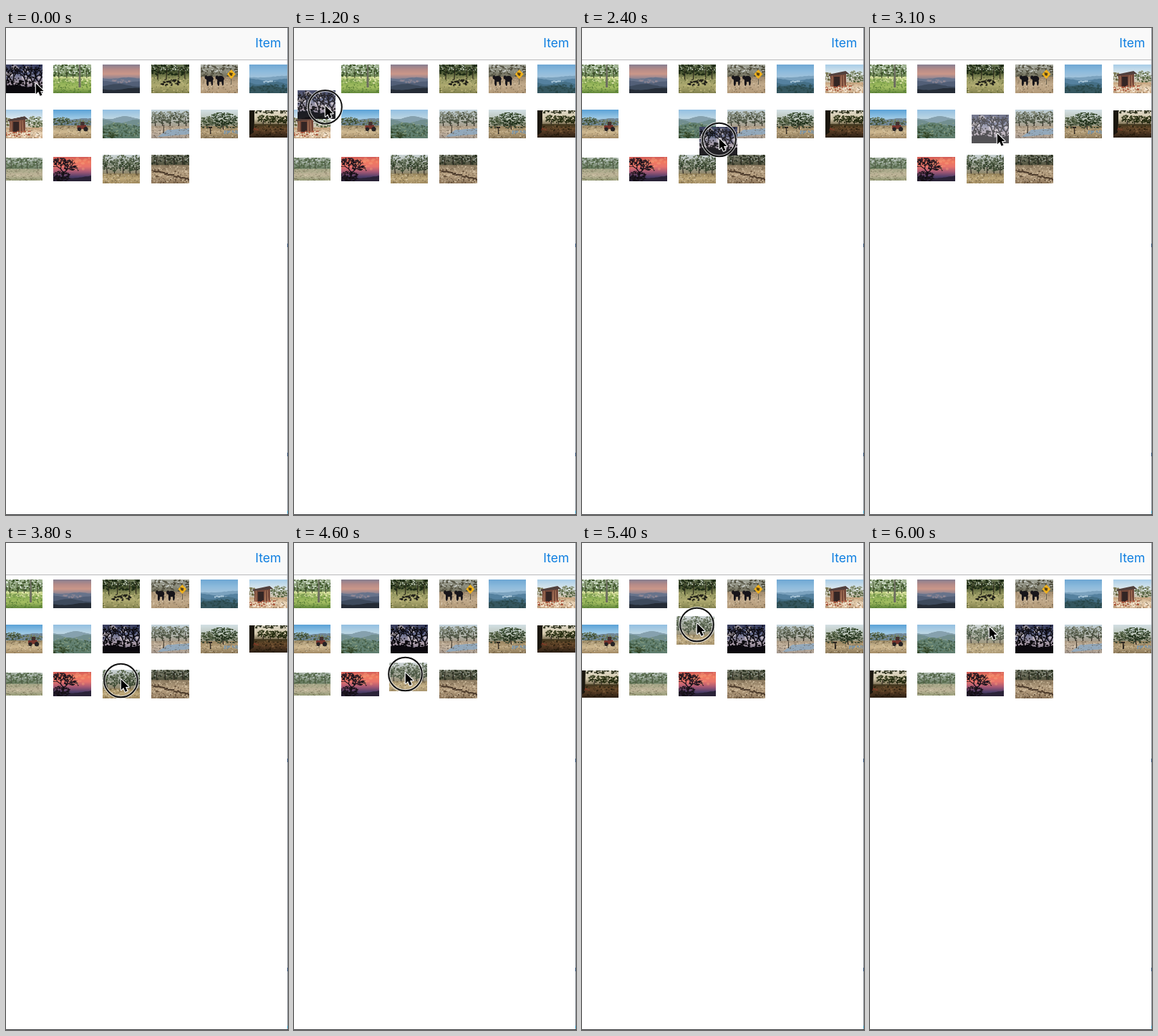
Write an HTML page with a canvas that moves like this. It is 394 px wide and 680 px high and loops after 6.1 s.

```html
<!DOCTYPE html>
<html lang="en">
<head>
<meta charset="utf-8">
<title>Reorder grid</title>
<style>
  html, body { margin: 0; width: 100%; height: 100%; overflow: hidden; background: #fff; }
  #stage { position: relative; width: 394px; height: 680px; overflow: hidden; background: #fff; }
  header { position: absolute; inset: 0 0 auto 0; height: 44px; background: #f9f9f9; border-bottom: 1px solid #b9b9bb; }
  header span { position: absolute; right: 9.5px; top: 10px; font: 17.6px/22px Inter, "Liberation Sans", sans-serif; color: #0f7fe0; }
  canvas { position: absolute; left: 0; top: 0; width: 394px; height: 680px; }
</style>
</head>
<body>
<div id="stage"><header><span>Item</span></header><canvas id="view"></canvas></div>
<script>
const LOOP = 6100, STEP = 100, MOVE = 300;
const W = 52.5, H = 39.5;
const dpr = window.devicePixelRatio || 1;
const view = document.getElementById('view');
view.width = 394 * dpr;
view.height = 680 * dpr;
const ctx = view.getContext('2d');

// ---- thumbnails ----
let g, seed = 1;
const rnd = (a = 0, b = 1) => {
  seed = seed * 16807 % 2147483647;
  return a + (b - a) * seed / 2147483647;
};
const box = (x, y, w, h, color) => { g.fillStyle = color; g.fillRect(x, y, w, h); };
const dot = (x, y, rx, ry) => { g.beginPath(); g.ellipse(x, y, rx, ry, 0, 0, 7); g.fill(); };

function poly(color, ...pts) {
  g.fillStyle = color;
  g.beginPath();
  pts.forEach(([x, y]) => g.lineTo(x, y));
  g.fill();
}
function fade(y, h, ...colors) {
  const grad = g.createLinearGradient(0, y, 0, y + h);
  colors.forEach((c, i) => grad.addColorStop(i / (colors.length - 1), c));
  box(0, y, W, h, grad);
}
function ridge(y, amp, color) {
  const a = rnd(0, 6), k = rnd(0.08, 0.16), pts = [[0, H]];
  for (let x = 0; x <= W + 3; x += 3) pts.push([x, y + amp * Math.sin(a + x * k) + rnd(-0.4, 0.4)]);
  poly(color, ...pts, [W + 3, H]);
}
function specks(x, y, w, h, n, r, color) {
  g.fillStyle = color;
  while (n--) dot(rnd(x, x + w), rnd(y, y + h), rnd(r * 0.4, r), rnd(r * 0.3, r * 0.75));
}
// Oval crown of small leaves, shaded towards its foot.
function crown(x, y, rx, ry, dark, light) {
  for (let i = 0; i < rx * ry * 1.1; i++) {
    const a = rnd(0, 6.3), d = Math.sqrt(rnd()), dy = Math.sin(a) * d;
    g.fillStyle = rnd(-1.4, 0.8) > dy ? light : dark;
    dot(x + Math.cos(a) * d * rx, y + dy * ry, rnd(0.5, 1.6), rnd(0.4, 1.2));
  }
}
function trunk(x, top, base, w, color) {
  const lean = rnd(-1.5, 1.5);
  poly(color, [x, base], [x + lean, top], [x + lean + w * 0.6, top], [x + w, base]);
}
function tree(x, base, w, h, dark, light) {
  trunk(x, base - h * 0.6, base, 1.3, '#2d261f');
  crown(x, base - h * 0.62, w / 2, h * 0.38, dark, light);
}
function branch(x, y, a, len) {
  if (len < 2) return;
  const x2 = x + Math.cos(a) * len, y2 = y + Math.sin(a) * len;
  g.lineWidth = len / 7 + 0.3;
  g.beginPath();
  g.moveTo(x, y);
  g.lineTo(x2, y2);
  g.stroke();
  for (const s of [-1, 1]) branch(x2, y2, a + s * rnd(0.25, 0.75), len * rnd(0.65, 0.8));
}
// Dry ground with flecks of shade and light.
function ground(y, ...colors) {
  fade(y, H - y, ...colors);
  specks(0, y, W, H - y, 60, 1.3, '#3c301e55');
  specks(0, y, W, H - y, 45, 1.3, '#f4e8cf66');
}

const photos = [
  { draw() { // bare trees at dusk
    fade(0, H, '#363b5c', '#6f7594', '#a99ba6', '#56536e');
    specks(0, 3, W, 20, 14, 5, '#e6d8d899');
    specks(0, 0, W, 24, 14, 4, '#2a305399');
    ridge(30, 1.5, '#0b090e');
    g.strokeStyle = '#0b090e';
    for (const x of [4, 13, 30, 41, 49]) branch(x, 36, -1.57 + rnd(-0.2, 0.2), 11);
    specks(0, 0, W, 34, 70, 1.6, '#0b090e');
    specks(0, 22, W, 11, 40, 2, '#0b090e');
  } },
  { draw() { // green meadow
    fade(0, H, '#a9bb9c', '#6c8650', '#a9c06c');
    specks(0, 0, W, 17, 100, 1.9, '#3c5529');
    specks(0, 0, W, 13, 55, 1.4, '#e6efe6');
    fade(17, H - 17, '#c6d28b', '#8cae55', '#a5bf63', '#648a3c');
    specks(0, 17, W, 9, 40, 2, '#dbe3a4');
    specks(0, 20, W, 19, 110, 1.3, '#4b7230aa');
    trunk(35, 0, 32, 3.2, '#6d6d60');
    for (const x of [7, 18, 27, 46]) trunk(x, 4, 19, 1, '#3b4129');
  } },
  { draw() { // hazy dusk
    fade(0, H, '#878091', '#b48a88', '#cb988a', '#8d8492', '#66718a', '#434f65', '#2b3444');
    ridge(19, 1, '#67738b');
    ridge(24, 1.5, '#525f77');
    specks(14, 21, 24, 5, 18, 2, '#a8949a77');
    ridge(29, 2, '#3d4a5c');
    ridge(34, 1.5, '#252c36');
  } },
  { draw() { // grove
    fade(0, H, '#6d7a59', '#46522f', '#939660', '#aeaa70', '#848350');
    specks(0, 0, W, 15, 110, 1.9, '#1f2c17');
    specks(0, 0, W, 11, 40, 1.1, '#d8e0d2');
    for (const x of [8, 20, 37, 46]) trunk(x, 3, 21, 1.2, '#282518');
    specks(0, 17, W, 22, 65, 1.3, '#d8cc92aa');
    specks(0, 17, W, 22, 50, 1.2, '#535a2faa');
    specks(9, 21, 30, 8, 30, 2, '#23221a');
  } },
  { draw() { // cattle
    fade(0, 19, '#a5a89d', '#706d58');
    specks(0, 0, W, 16, 90, 1.8, '#504e3e');
    specks(0, 0, W, 11, 40, 1.2, '#cfd3d0');
    ground(17, '#a08a6d', '#c2ab8c', '#b39a79');
    g.fillStyle = '#17151a';
    for (const x of [13, 28]) {
      dot(x, 20, 5, 4.2);
      dot(x - 5, 18, 2.2, 2.6);
      dot(x - 3, 25, 1.6, 5);
      dot(x + 3, 25, 1.4, 4.5);
    }
    trunk(42.5, 12, 28, 1, '#5e5848');
    poly('#efb11c', [43, 7], [49, 13.5], [43, 20], [37, 13.5]);
    poly('#594313', [40, 11], [45, 12], [44, 16], [41, 15]);
  } },
  { draw() { // blue lake
    fade(0, H, '#6fa8d4', '#8dbbdd', '#a6c5da', '#6d98b6', '#395c70');
    ridge(17, 1.2, '#7ba2be');
    ridge(21, 1.5, '#55819f');
    specks(20, 23, 18, 2, 14, 1.8, '#a9c6d8');
    ridge(26, 2, '#456f86');
    ridge(31, 2, '#35565f');
    specks(0, 28, W, 11, 60, 1.7, '#274343aa');
  } },
  { draw() { // hut
    fade(0, 26, '#a8cde8', '#dfe9ed', '#c8b99f');
    crown(43, 17, 13, 8, '#55633f', '#879070');
    crown(3, 16, 6, 6, '#66653f', '#8e8a66');
    ground(25, '#c39f78', '#e6d0b2', '#c9a683');
    box(7, 13, 22, 18, '#75493a');
    for (const x of [8, 21, 25]) trunk(x, 15, 31, 1.6, '#a8765a');
    box(12, 17, 8, 14, '#332524');
    poly('#51403d', [4, 14], [28, 9], [33, 13], [5, 16]);
    specks(0, 30, 36, 7, 30, 1.8, '#a8553b');
    specks(0, 31, W, 8, 30, 1.6, '#f7e9d6');
  } },
  { draw() { // tractor
    fade(0, 24, '#5ca3d8', '#9fcae5', '#a7b6aa');
    ridge(13, 1, '#72899a');
    crown(10, 16, 14, 6, '#3c4d33', '#66745a');
    crown(38, 18, 15, 4, '#4b5a3e', '#75805f');
    ground(22, '#9d8d6a', '#d0ba92', '#a48c67');
    poly('#77362e', [33, 22], [45, 21], [47, 27], [33, 27]);
    box(38, 17, 5, 5, '#42302f');
    g.fillStyle = '#262325';
    dot(36, 27, 2.7, 2.8);
    dot(45, 27, 3.2, 3.2);
  } },
  { draw() { // hazy hills
    fade(0, H, '#94c0e2', '#c0d8e3', '#7f9a98', '#5d7358');
    ridge(11, 2, '#86a1ae');
    ridge(16, 2.5, '#728f90');
    ridge(21, 3, '#617f70');
    specks(0, 21, W, 18, 90, 1.8, '#3a5339aa');
    specks(0, 17, W, 20, 60, 1.4, '#9aab8799');
    crown(8, 35, 12, 5, '#334629', '#55694a');
  } },
  { draw() { // roadside trees
    fade(0, 26, '#c3d3dc', '#b4b9b2', '#a1947f');
    for (const x of [5, 15, 25, 37, 48]) tree(x, 25, 14, 23, '#4e5544', '#858b7b');
    ground(23, '#ab9a83', '#c7b6a3', '#a2968c');
    poly('#93a9bc', [22, 28], [W, 26], [W, 34], [8, 38]);
    specks(0, 26, W, 12, 30, 1.3, '#665c5088');
    trunk(16, 21, 33, 1.3, '#3f382e');
  } },
  { draw() { // oak
    fade(0, 26, '#d3e0e5', '#bcc5ba', '#8f8a70');
    specks(0, 13, W, 10, 60, 1.8, '#6a735d');
    ground(23, '#96835f', '#b7a17b', '#8d7a5a');
    tree(31, 28, 42, 24, '#25351f', '#43563a');
    crown(9, 15, 9, 6, '#465438', '#6c775b');
    specks(0, 20, W, 6, 30, 1.8, '#3b4530');
    specks(32, 29, 20, 4, 16, 1.8, '#7d95a6');
    trunk(13, 24, 34, 1.8, '#2c2620');
    box(11, 24, 5, 2, '#2c2620');
  } },
  { h: 38, draw() { // dark field
    fade(0, 24, '#ded8c8', '#d4c9ac', '#56492e');
    specks(0, 0, W, 4, 40, 1.9, '#2c301b');
    for (const x of [18, 29, 40, 50]) tree(x, 22, 15, 15, '#23290f', '#454a2a');
    fade(20, H - 20, '#3c341c', '#624629', '#4a331f', '#2c2015');
    specks(8, 22, W, 12, 40, 1.4, '#94704677');
    specks(0, 22, W, 17, 50, 1.5, '#1d1609aa');
    poly('#1b170f', [0, 0], [7, 0], [6, 32], [0, 36]);
    specks(0, 26, 12, 4, 6, 1.2, '#8a3325');
  } },
  { h: 32, draw() { // pale field
    fade(0, 21, '#a3b0a2', '#6f8066');
    specks(0, 0, W, 19, 130, 2, '#566a4b');
    specks(0, 0, W, 12, 45, 1.3, '#c9d2cf');
    for (const x of [9, 24, 32, 45]) trunk(x, 3, 20, 1.1, '#454f3b');
    ground(19, '#a5a787', '#c0b59a', '#969c78');
    specks(0, 22, W, 17, 50, 1.3, '#7c876577');
  } },
  { h: 34.5, draw() { // red sunset
    fade(0, H, '#d25a56', '#f07a60', '#e8736c', '#a95a75', '#51406b', '#2c2640');
    specks(18, 2, 35, 18, 26, 3, '#f8a07a66');
    ridge(32, 2, '#2a2338');
    g.strokeStyle = '#17111a';
    branch(12, 38, -1.4, 12);
    crown(11, 8, 14, 6, '#17111a', '#33202a');
    crown(24, 17, 9, 5, '#17111a', '#33202a');
    crown(9, 32, 15, 9, '#120e14', '#1d151d');
  } },
  { draw() { // oaks in dry grass
    fade(0, 28, '#cbd4d6', '#a7ab9f', '#8a7f60');
    for (const x of [6, 28, 46]) tree(x, 28, 21, 28, '#303e29', '#66735a');
    for (const x of [16, 38]) tree(x, 28, 12, 22, '#3f4c35', '#78836c');
    specks(0, 0, W, 16, 25, 1, '#d8dede');
    ground(26, '#948259', '#c0aa7b', '#a08a5f');
  } },
  { draw() { // brown furrow
    fade(0, 16, '#7d806f', '#4f4e39');
    specks(0, 0, W, 14, 110, 1.8, '#303727');
    specks(0, 0, W, 10, 35, 1.1, '#bec4bf');
    for (const x of [6, 19, 31, 43]) trunk(x, 2, 16, 1.3, '#2b281f');
    ground(14, '#8d7c61', '#b9a283', '#8f785c');
    specks(0, 15, W, 23, 70, 1.2, '#d2bfa1');
    g.fillStyle = '#4b3a2b';
    for (let x = 4; x < W; x += 2.2) dot(x, 21 + x * 0.25 + rnd(-1, 1), 1.7, 1.1);
    specks(0, 20, W, 19, 45, 1.4, '#5d4935');
  } }
];

photos.forEach((p, i) => {
  p.h = p.h || H;
  p.img = document.createElement('canvas');
  p.img.width = Math.round(W * dpr * 2);
  p.img.height = Math.round(p.h * dpr * 2);
  g = p.img.getContext('2d');
  g.scale(p.img.width / W, p.img.height / H);
  seed = 977 * (i + 3);
  p.draw();
});

// ---- motion ----
const slot = n => [-2 + 68.45 * (n % 6), 51 + 63.2 * Math.floor(n / 6)];
const unit = u => Math.min(1, Math.max(0, u));
const ease = u => (1 - Math.cos(Math.PI * unit(u))) / 2;
const mix = (a, b, u) => a.map((v, i) => v + (b[i] - v) * u);

// Linear path through [time, x, y] stops.
function along(path, t) {
  const n = path.findIndex(p => p[0] > t);
  if (n === 0) return path[0].slice(1);
  if (n < 0) return path[path.length - 1].slice(1);
  const a = path[n - 1], b = path[n];
  return mix(a.slice(1), b.slice(1), (t - a[0]) / (b[0] - a[0]));
}

// [start, first item, last item, slot change]
const shifts = [
  [1324, 1, 6, -1], [1660, 7, 7, -1], [2520, 8, 8, -1],
  [4792, 9, 13, 1], [4792, 0, 0, 1]
];
const drags = [
  { item: 0, press: 200, lift: 700, drop: 2950, to: 8,
    path: [[800, -2, 51], [1000, -1, 62], [1300, 8, 100], [1600, 39, 111], [1900, 84, 140],
           [2200, 145, 144], [2400, 164, 138], [2700, 155, 133], [2950, 149, 128]] },
  { item: 14, press: 3600, lift: 4500, drop: 5750, to: 8,
    path: [[4500, 135, 177.4], [4600, 133, 167], [4800, 121, 125], [5000, 115, 94],
           [5200, 122, 92], [5400, 132, 102], [5750, 134, 112]] }
];
const pointer = [
  [0, 41, 76], [200, 36, 71], [800, 36, 71], [1000, 37, 82], [1300, 46, 120], [1600, 77, 131.5],
  [1900, 115, 156], [2200, 172, 159], [2400, 191, 153], [2700, 182, 148], [2950, 177, 146],
  [3150, 177, 146], [3600, 160, 189], [4500, 160, 189], [4600, 155, 180], [4800, 147, 137],
  [5000, 142, 106], [5200, 149, 104], [5400, 160, 111], [5750, 166, 116]
];

function place(i, t) {
  const drag = drags.find(d => d.item === i);
  let start = i, pos;
  if (drag && t >= drag.drop) {
    start = drag.to;
    pos = mix(along(drag.path, t), slot(start), ease((t - drag.drop) / MOVE));
  } else if (drag && t >= drag.lift) {
    return along(drag.path, t);
  } else {
    pos = slot(i);
  }
  for (const [at, first, last, by] of shifts) {
    if (i < first || i > last || t < at) continue;
    pos = mix(slot(start), slot(start + by), ease((t - at) / MOVE));
    start += by;
  }
  return pos;
}

function put(i, t) {
  const p = photos[i], [x, y] = place(i, t);
  ctx.drawImage(p.img, x, y + (H - p.h) / 2, W, p.h);
}

function drawPointer(x, y, pressed) {
  if (pressed) {
    ctx.beginPath();
    ctx.arc(x + 0.5, y + 3, 23.3, 0, 7);
    ctx.strokeStyle = 'rgba(255,255,255,.7)';
    ctx.lineWidth = 4;
    ctx.stroke();
    ctx.strokeStyle = '#111';
    ctx.lineWidth = 2;
    ctx.stroke();
  }
  ctx.save();
  ctx.translate(x + 0.8, y + 1.5);
  ctx.scale(0.84, 0.84);
  const arrow = new Path2D('M0 0V17.5L4 13.7L7 20.5L10.3 19L7.4 12.5H12.8Z');
  ctx.lineJoin = 'round';
  ctx.strokeStyle = '#fff';
  ctx.lineWidth = 2.6;
  ctx.stroke(arrow);
  ctx.fillStyle = '#000';
  ctx.fill(arrow);
  ctx.restore();
}

function drawEdges() {
  ctx.fillStyle = '#8d9299';
  ctx.fillRect(393, 0, 1, 680);
  ctx.fillStyle = '#35373a';
  ctx.fillRect(0, 679, 394, 1);
  ctx.fillStyle = '#27466d';
  for (const y of [301, 593]) ctx.fillRect(393, y, 1, 5);
  ctx.fillStyle = '#3f9fc4';
  ctx.fillRect(393, 674, 1, 4);
}

function render(t) {
  ctx.setTransform(dpr, 0, 0, dpr, 0, 0);
  ctx.clearRect(0, 0, 394, 680);
  const held = drags.find(d => t >= d.lift && t < d.drop + MOVE);
  photos.forEach((p, i) => { if (!held || held.item !== i) put(i, t); });
  if (held) {
    // The lifted copy cross-fades with the cell as it lands.
    const u = unit((t - held.drop) / MOVE);
    ctx.globalAlpha = 0.9 + 0.1 * u - 0.25 * Math.sin(Math.PI * u);
    put(held.item, t);
    ctx.globalAlpha = 1;
  }
  drawEdges();
  drawPointer(...along(pointer, t), drags.some(d => t >= d.press && t < d.drop));
}

let origin;
function tick(now) {
  if (origin === undefined) origin = now;
  const t = (now - origin) % LOOP;
  render(Math.floor(t / STEP) * STEP);
  requestAnimationFrame(tick);
}
render(0);
requestAnimationFrame(tick);
</script>
</body>
</html>
```
